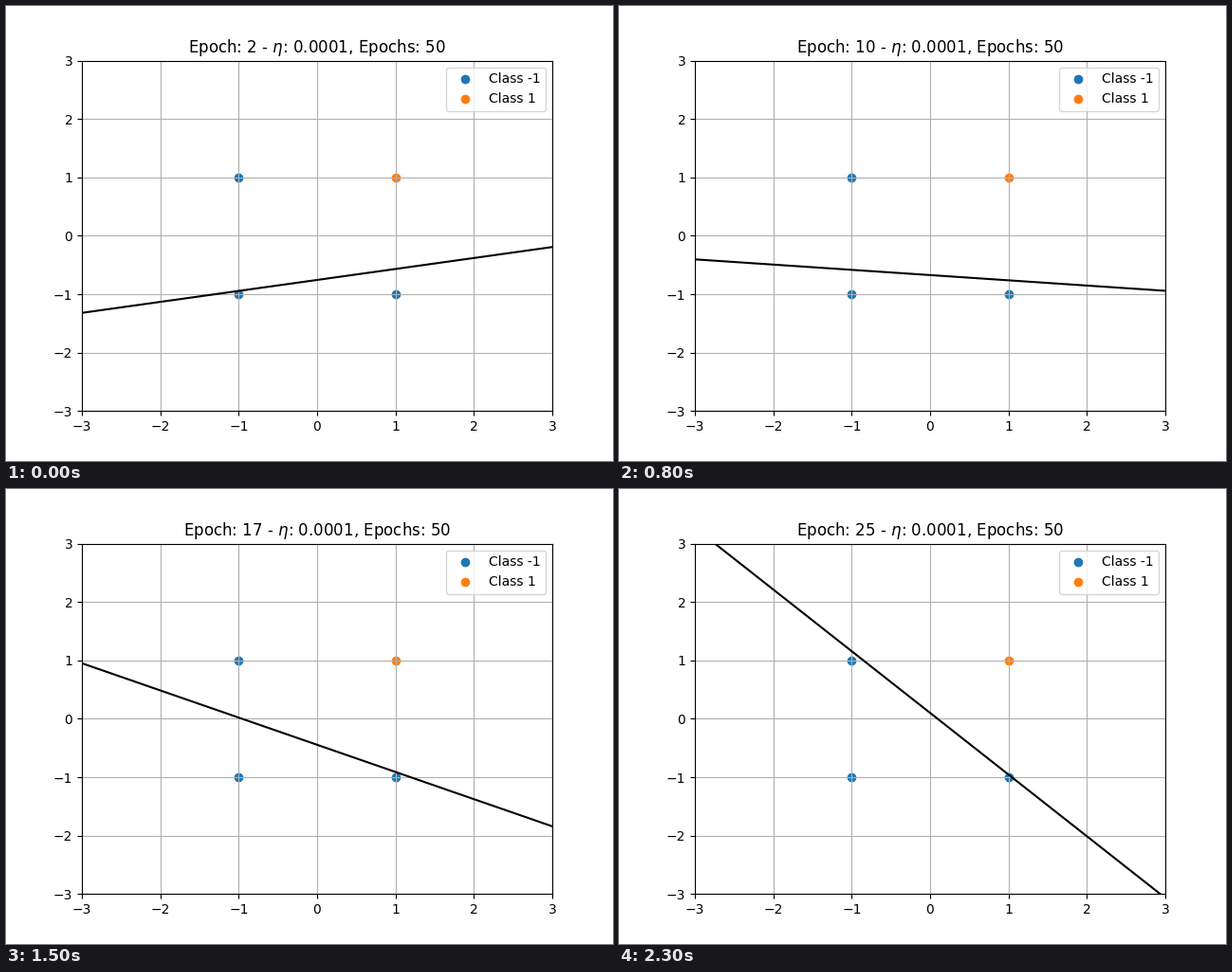
Write a matplotlib script that moves like this. It is 640 px wide and 480 px high and loops after 2.4 s.

```python
import numpy as np
import matplotlib.pyplot as plt
from matplotlib.animation import FuncAnimation

ETA, EPOCHS = 0.0001, 50
FIRST, FRAMES = 2, 24
LIM = 3

points = np.array([[-1, -1], [-1, 1], [1, -1], [1, 1]])
labels = np.array([-1, -1, -1, 1])
inputs = np.column_stack([np.ones(4), points])


def train(weights, steps):
    """Batch perceptron; weights are in units of one update (2 * ETA)."""
    history = [weights]
    for _ in range(steps - 1):
        wrong = np.sign(inputs @ weights) != labels
        weights = weights + labels[wrong] @ inputs[wrong]
        history.append(weights)
    return history


history = train(np.array([23.75, -5.9, 31.4]), FRAMES)

fig, ax = plt.subplots(figsize=(6.4, 4.8), dpi=100)
for label in (-1, 1):
    ax.scatter(*points[labels == label].T, label=f"Class {label}")
xs = np.array([-LIM, LIM])
boundary, = ax.plot(xs, xs, color="black")
title = ax.set_title("")
ax.set_xlim(-LIM, LIM)
ax.set_ylim(-LIM, LIM)
ax.grid(True)
ax.legend(loc="upper right")


def update(i):
    bias, wx, wy = history[i]
    boundary.set_ydata(-(bias + wx * xs) / wy)
    title.set_text(rf"Epoch: {FIRST + i} - $\eta$: {ETA}, Epochs: {EPOCHS}")
    return boundary, title


anim = FuncAnimation(fig, update, frames=FRAMES, interval=100,
                     repeat=True, repeat_delay=0, blit=False)
plt.show()
```
